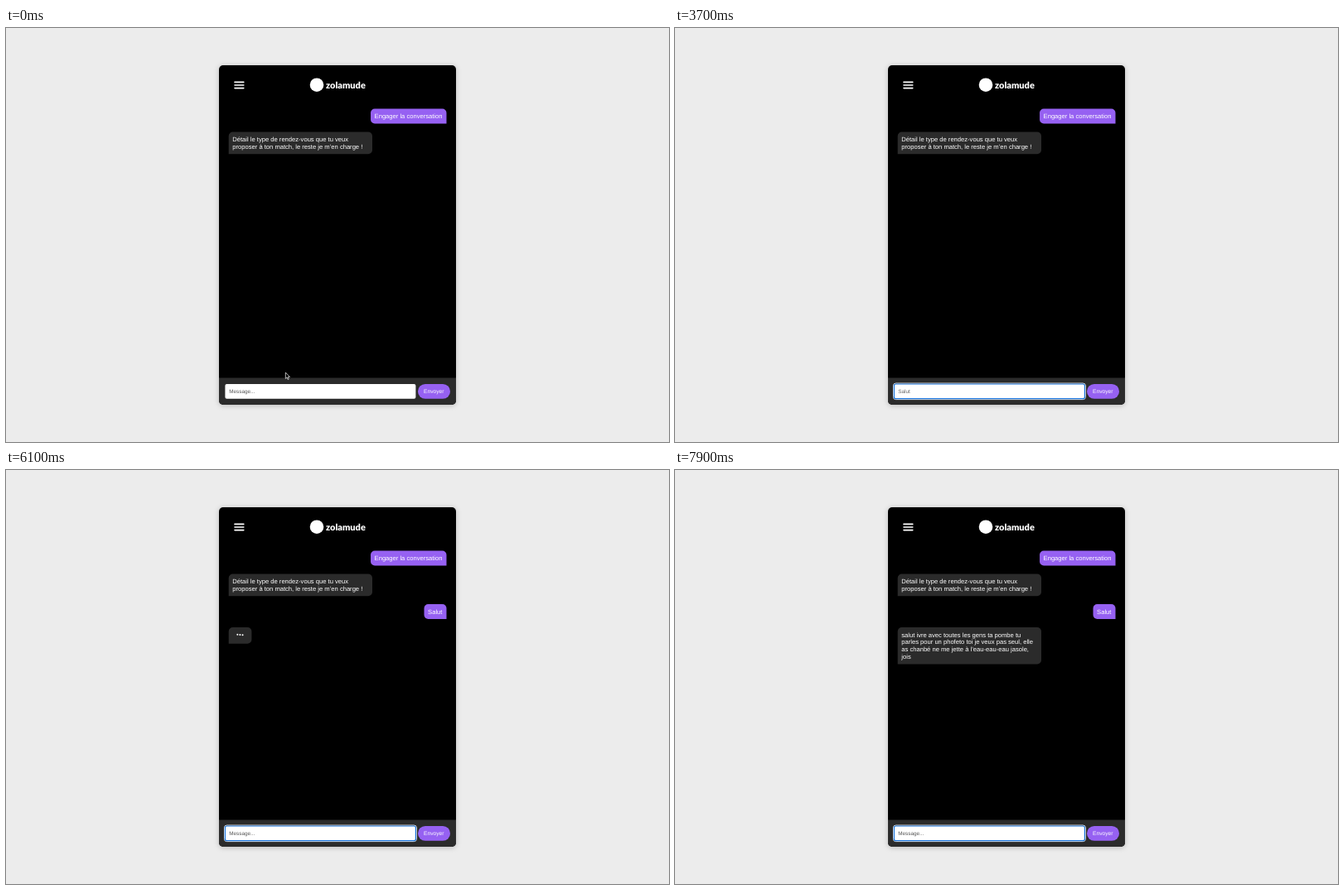
Animation of 800x500 px, one loop 8 s. Source, as an HTML page:

```html
<!DOCTYPE html>
<html lang="fr">
<head>
<meta charset="utf-8">
<title>Chat</title>
<style>
  html, body { margin: 0; width: 100%; height: 100%; overflow: hidden; background: #ececec; }
  svg { display: block; width: 800px; height: 500px; }
  text { font-family: "Liberation Sans", Arial, sans-serif; text-rendering: geometricPrecision; white-space: pre; }
  .msg { font-size: 7.6px; fill: #fff; }
  .panel { filter: drop-shadow(0 1px 3px rgba(0, 0, 0, .22)); }
  .brand { font: 900 11px Lato, sans-serif; fill: #fff; }
</style>
</head>
<body>
<svg viewBox="0 0 800 500">
  <clipPath id="round"><rect x="257" y="45" width="286" height="410" rx="5"/></clipPath>
  <rect width="800" height="500" fill="#ececec"/>
  <rect class="panel" x="257" y="45" width="286" height="410" rx="5"/>
  <rect x="257" y="422.5" width="286" height="33" fill="#2b2b2b" clip-path="url(#round)"/>

  <path d="M276 65.4H286.8M276 69H286.8M276 72.6H286.8" stroke="#fff" stroke-width="1.6" stroke-linecap="round"/>
  <circle cx="375" cy="68.7" r="8.3" fill="#fff"/>
  <text class="brand" x="386" y="73">zolamude</text>

  <g id="chat"></g>

  <rect x="264.4" y="430" width="230" height="17.7" rx="2" fill="#fff"/>
  <g id="ring" fill="none">
    <rect id="halo" stroke="#fff" stroke-width="1"/>
    <rect id="edge" stroke="#1a73d9" stroke-width="1.2"/>
  </g>
  <text id="field" x="269.3" y="441.2" font-size="6.35"></text>
  <rect id="caret" y="435.2" width=".6" height="7.6"/>

  <rect x="497" y="430" width="39" height="17.8" rx="8.9" fill="#9661f2"/>
  <text x="504" y="441.2" font-size="6.7" fill="#fff">Envoyer</text>

  <path id="arrow" d="M0 0V7.4L1.7 5.9L2.8 8.5L4 8L2.9 5.4H5.2Z" fill="#000" stroke="#fff" stroke-width=".7"/>
  <path id="beam" d="M-1.7 -4.5Q0 -4.5 0 -3.3Q0 -4.5 1.7 -4.5M0 -3.5V3.5M-1.7 4.5Q0 4.5 0 3.3Q0 4.5 1.7 4.5M-1 1.3H1"
        fill="none" stroke="#111" stroke-width=".9"/>
</svg>
<script>
  const LOOP = 8000, SENT = 4000, REPLY = 7500, FOCUS = 1100;
  const TYPING = [[2500, "S"], [2700, "Sa"], [2900, "Sal"], [3100, "Salu"], [3200, "Salut"]];
  const BLINK_STARTS = [1200, ...TYPING.map(step => step[0])];

  const $ = id => document.getElementById(id);
  const show = (el, on) => el.setAttribute("visibility", on ? "visible" : "hidden");
  const set = (el, attrs) => { for (const k in attrs) el.setAttribute(k, attrs[k]); return el; };
  const add = (parent, tag, attrs) =>
    parent.appendChild(set(document.createElementNS("http://www.w3.org/2000/svg", tag), attrs));

  // Rounded box with one square bottom corner on the speaker's side
  function bubble(x, y, w, h, mine, lines = []) {
    const r = 5, right = mine ? 0 : r, left = mine ? r : 0;
    const g = add($("chat"), "g", {});
    add(g, "path", {
      fill: mine ? "#9661f2" : "#2b2b2b",
      d: `M${x + r} ${y}h${w - 2 * r}a${r} ${r} 0 0 1 ${r} ${r}v${h - r - right}` +
         `a${right} ${right} 0 0 1 ${-right} ${right}H${x + left}` +
         `a${left} ${left} 0 0 1 ${-left} ${-left}V${y + r}a${r} ${r} 0 0 1 ${r} ${-r}z`
    });
    lines.forEach((line, i) => {
      add(g, "text", { class: "msg", x: x + 4.6, y: y + 11.5 + i * 8.8 }).textContent = line;
    });
    return g;
  }

  bubble(440, 97.5, 91.5, 18, true, ["Engager la conversation"]);
  bubble(268.7, 125.5, 173.3, 26.8, false, [
    "Détail le type de rendez-vous que tu veux",
    "proposer à ton match, le reste je m’en charge !"
  ]);
  const sent = bubble(504.5, 162, 27, 18, true, ["Salut"]);
  const wait = bubble(268.7, 190, 27.7, 19.8, false);
  const dots = [279.3, 282.4, 285.5].map(cx => add(wait, "circle", { cx, r: 1, fill: "#fff" }));
  const reply = bubble(268.7, 190, 173.3, 44.5, false, [
    "salut ivre avec toutes les gens ta pombe tu",
    "parles pour un phofeto toi je veux pas seul, elle",
    "as chanbé ne me jette à l’eau-eau-eau jasole,",
    "jois"
  ]);

  function drawPointer(t) {
    const p = Math.min(1, Math.max(0, t / 600));
    const ease = p * p * (3 - 2 * p);
    const x = 337.3 - 9.2 * ease, y = 416 + 25 * ease;
    const inField = y > 430;
    set($("arrow"), { transform: `translate(${x} ${y})` });
    set($("beam"), { transform: `translate(${x} ${y})` });
    show($("arrow"), !inField);
    show($("beam"), inField && t < TYPING[0][0]);
  }

  function drawRing(t) {
    const p = Math.min(1, Math.max(0, (t - FOCUS) / 200));
    const grow = 5 * (1 - p);
    const frame = (el, out) => set(el, {
      x: 264.4 - out, y: 430 - out, width: 230 + 2 * out, height: 17.7 + 2 * out, rx: 2 + out
    });
    frame($("halo"), .9 + grow);
    frame($("edge"), grow);
    set($("ring"), { opacity: .3 + .7 * p });
    show($("ring"), t >= FOCUS);
  }

  function drawField(t) {
    const step = t < SENT && TYPING.filter(s => s[0] <= t).pop();
    const field = $("field"), caret = $("caret");
    field.textContent = step ? step[1] : "Message...";
    set(field, { fill: step ? "#666" : "#555" });
    const start = BLINK_STARTS.filter(s => s <= t).pop();
    set(caret, { x: 269.4 + (step ? field.getComputedTextLength() : 0) });
    show(caret, start !== undefined && Math.floor((t - start) / 500) % 2 === 0);
  }

  function drawChat(t) {
    show(sent, t >= SENT);
    show(wait, t >= SENT && t < REPLY);
    show(reply, t >= REPLY);
    dots.forEach((dot, i) =>
      set(dot, { cy: 198.9 - .35 * Math.sin((t / 1200 - i / 6) * 2 * Math.PI) }));
  }

  function draw() {
    const t = performance.now() % LOOP;
    drawPointer(t);
    drawRing(t);
    drawField(t);
    drawChat(t);
    requestAnimationFrame(draw);
  }
  draw();
</script>
</body>
</html>
```
